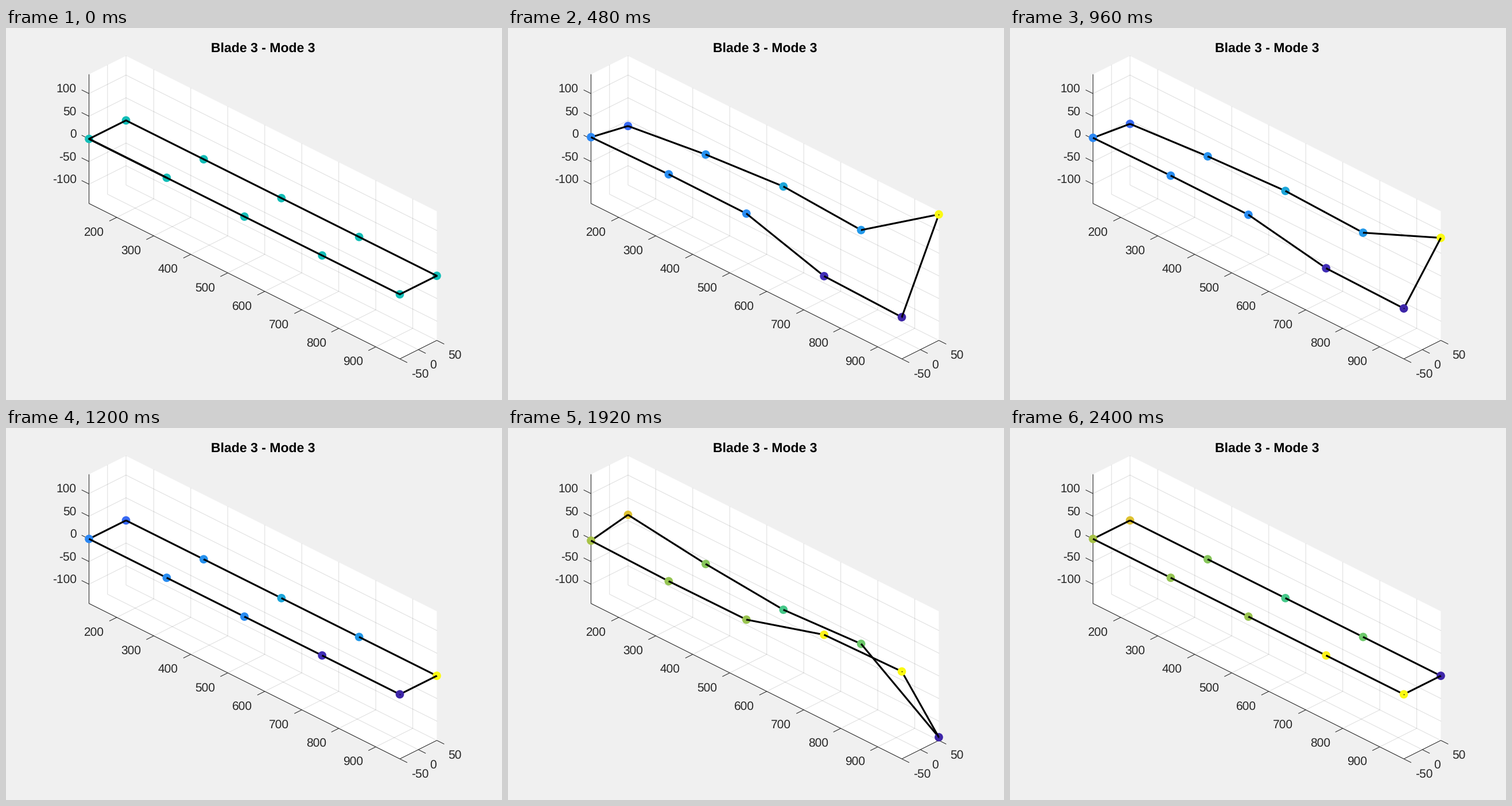
A matplotlib script that plays this animation: 864x648 px, repeating every 2.52 s.

```python
import numpy as np
import matplotlib.pyplot as plt
from matplotlib.animation import FuncAnimation
from matplotlib.colors import LinearSegmentedColormap

W, H, DPI = 864, 648, 150
FRAMES, INTERVAL = 21, 120
HALF = FRAMES // 2
INK = "#262626"
X0, X1, Y0, Y1, ZM = 125, 965, -50, 50, 142.5
TICK = 20

plt.rcParams.update({"font.family": "Liberation Sans", "text.hinting": "none",
                     "text.hinting_factor": 1})

parula = LinearSegmentedColormap.from_list(
    "parula", "#3e26a8 #474aec #307cf9 #1f9ee6 #12beb9 "
              "#59cc78 #ccbd30 #feca36 #fbfa12".split())


def project(x, y, z):
    """Isometric view (azimuth 45, elevation 30) in stage pixels."""
    s = .9115
    u, v = np.asarray(x) - X0, np.asarray(y) - Y0
    return (144.6 + s * np.sqrt(.5) * (u + v),
            193.2 + s * np.sqrt(.125) * (u - v) - s * np.sqrt(.75) * np.asarray(z))


def depth(x, y, z):
    """Closeness to the viewer."""
    return np.sqrt(.375) * (x - y) + .5 * z


fig = plt.figure(figsize=(W / DPI, H / DPI), dpi=DPI, facecolor="#f0f0f0")
ax = fig.add_axes([0, 0, 1, 1])
ax.set(xlim=(0, W), ylim=(H, 0))
ax.axis("off")


def path3(*points, **style):
    ax.plot(*project(*np.transpose(points)), **style)


grid = dict(color=INK, alpha=.15, lw=.5, zorder=1)
axis = dict(color=INK, lw=.5, zorder=2, solid_capstyle="butt")


def tick(x, y, z, step, value, dx, dy, ha):
    end = np.add((x, y, z), step)
    path3((x, y, z), end, **axis)
    px, py = project(*end)
    ax.text(px + dx, py + dy, str(value), ha=ha, va="baseline",
            size=10, color=INK)


# The box silhouette is a hexagon: each coordinate flips once every three corners
side = np.arange(6) // 3
ax.fill(*project(X0 + (X1 - X0) * np.roll(side, -1),
                 Y0 + (Y1 - Y0) * np.roll(side, -2),
                 ZM - 2 * ZM * side), color="white", lw=0, zorder=0)

path3((X0, Y0, ZM), (X0, Y0, -ZM), (X1, Y0, -ZM), (X1, Y1, -ZM), **axis)
for x in range(200, 901, 100):
    path3((x, Y0, -ZM), (x, Y1, -ZM), (x, Y1, ZM), **grid)
    tick(x, Y0, -ZM, (0, -TICK, 0), x, -9, 25.4, "right")
for y in range(Y0, Y1 + 1, 50):
    path3((X1, y, -ZM), (X0, y, -ZM), (X0, y, ZM), **grid)
    tick(X1, y, -ZM, (TICK, 0, 0), y, 7, 25.6, "left")
for z in range(-100, 101, 50):
    path3((X0, Y0, z), (X0, Y1, z), (X1, Y1, z), **grid)
    tick(X0, Y0, z, (-TICK, 0, 0), z, -9, 4.4, "right")

ax.text(W / 2 + 15.3, 41.8, "Blade 3 - Mode 3", ha="center", va="baseline",
        size=11, weight="bold", color="black")

# Blade nodes run out along the front edge and back along the rear edge
span = np.linspace(X0, X1, 5)
nx = np.r_[span, span[::-1]]
ny = np.repeat([Y0, Y1], 5)
mode = np.array([4, 8, 7, -48, -53, ZM, 16, 27, 11, -13])

stroke = dict(color="black", lw=1.5, solid_joinstyle="round")
rear, = ax.plot([], [], zorder=3, solid_capstyle="round", **stroke)
nodes = ax.scatter(nx, ny, s=50, linewidths=0, zorder=4)
dots = ax.scatter(nx, ny, s=.7, c="black", linewidths=0, zorder=5)
front, = ax.plot([], [], zorder=5, solid_capstyle="butt", **stroke)


def split_edges(pts, d):
    """Cut each edge in half: the far half covers its node, the near one does not."""
    nxt, d_nxt = np.roll(pts, -1, axis=0), np.roll(d, -1)
    rising = (d < d_nxt)[:, None]
    far, near = np.where(rising, pts, nxt), np.where(rising, nxt, pts)
    mid, gap = (far + near) / 2, np.full_like(pts, np.nan)
    return [np.stack([end, mid, gap], axis=1).reshape(-1, 2).T
            for end in (far, near)]


def update(i):
    z = mode * np.sin(np.pi * i / HALF)
    pts = np.column_stack(project(nx, ny, z))
    nodes.set_offsets(pts)
    dots.set_offsets(pts)
    if i == 0:  # flat blade: one colour, outline on top
        level = np.full(len(mode), .5)
        over, under = np.vstack([pts, pts[:2]]).T, ([], [])
    else:
        value = mode if i <= HALF else -mode
        level = (value - value.min()) / np.ptp(value)
        over, under = split_edges(pts, depth(nx, ny, z))
    front.set_data(*over)
    rear.set_data(*under)
    nodes.set_facecolor(parula(level))
    return rear, nodes, dots, front


anim = FuncAnimation(fig, update, frames=FRAMES, interval=INTERVAL,
                     init_func=lambda: update(0), repeat=True, repeat_delay=0)
plt.show()
```
